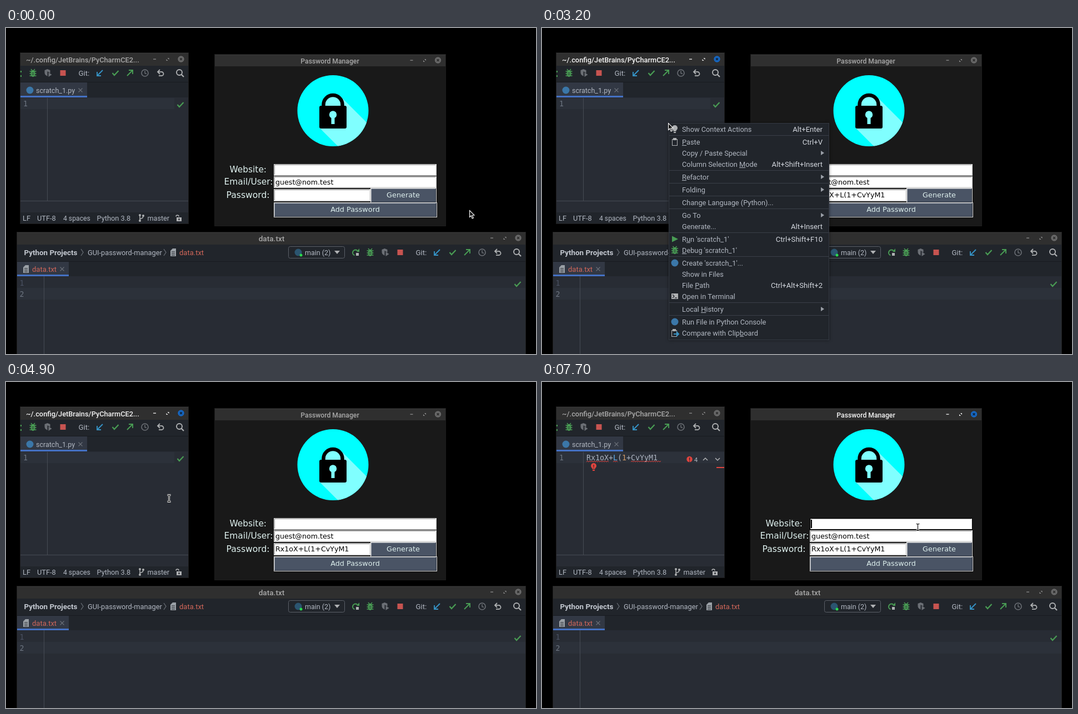
An HTML page with a canvas that plays this animation: 954x587 px, repeating every 8000 ms.

```html
<!DOCTYPE html>
<html lang="en">
<head>
<meta charset="utf-8">
<title>Password Manager demo</title>
<style>
html, body { margin: 0; width: 100%; height: 100%; overflow: hidden; background: #000; }
canvas { display: block; }
</style>
</head>
<body>
<canvas id="stage" width="954" height="587"></canvas>
<script>
const ctx = document.getElementById('stage').getContext('2d');
const LOOP = 8000;
const PASSWORD = 'Rx1oX+L(1+CvYyM1';
const EMAIL = 'guest@nom.test';
const C = {
  panel: '#21252b', editor: '#282c34', row: '#2c313a', tab: '#323844', text: '#b1b7c1',
  gray: '#afb1b3', dim: '#6b7078', line: '#464b54', green: '#499c54', blue: '#3592c4',
  red: '#c75450', untracked: '#d1675a', python: '#3b77a8', error: '#e0443e'
};
const ui = (size = 12.8, weight = 400) => `${weight} ${size}px Roboto, sans-serif`;
const tk = size => `${size}px "DejaVu Sans", sans-serif`;
const mono = '13.3px "DejaVu Sans Mono", monospace';

// --- basic helpers -------------------------------------------------------
function rect(x, y, w, h, fill) {
  ctx.fillStyle = fill;
  ctx.fillRect(x, y, w, h);
}
function frame(x, y, w, h, color) {
  ctx.strokeStyle = color;
  ctx.lineWidth = 1;
  ctx.strokeRect(x + .5, y + .5, w - 1, h - 1);
}
function disc(x, y, r, fill) {
  ctx.fillStyle = fill;
  ctx.beginPath();
  ctx.arc(x, y, r, 0, Math.PI * 2);
  ctx.fill();
}
function ring(x, y, r, color, width = 1.5, from = 0, to = Math.PI * 2) {
  ctx.strokeStyle = color;
  ctx.lineWidth = width;
  ctx.beginPath();
  ctx.arc(x, y, r, from, to);
  ctx.stroke();
}
function trace(x, y, pts) {
  ctx.beginPath();
  for (let i = 0; i < pts.length; i += 2) ctx.lineTo(x + pts[i], y + pts[i + 1]);
}
function line(x, y, pts, color, width = 1.5) {
  trace(x, y, pts);
  ctx.strokeStyle = color;
  ctx.lineWidth = width;
  ctx.stroke();
}
function poly(x, y, pts, fill) {
  trace(x, y, pts);
  ctx.fillStyle = fill;
  ctx.fill();
}
// y is the visual middle of the text line
function text(s, x, y, color = C.text, font = ui(), align = 'left') {
  ctx.font = font;
  ctx.textAlign = align;
  ctx.fillStyle = color;
  ctx.fillText(s, x, Math.round(y + 4.5));
}

// --- icons ---------------------------------------------------------------
const check = (x, y) => line(x, y, [-5, 0, -1.5, 4, 6, -4], C.green, 2.2);
const playRight = (x, y, color) => poly(x, y, [-5, -5.5, 6, 0, -5, 5.5], color);
const subArrow = (x, y) => poly(x, y, [-3, -4, 3, 0, -3, 4], '#9a9fa7');
const tabClose = (x, y) => {
  line(x, y, [-3.5, -3.5, 3.5, 3.5], C.dim, 1.1);
  line(x, y, [-3.5, 3.5, 3.5, -3.5], C.dim, 1.1);
};
function bug(x, y) {
  for (const dy of [-3, 1, 5]) line(x, y, [-6, dy, 6, dy], C.green, 1.5);
  ctx.fillStyle = C.green;
  ctx.beginPath();
  ctx.ellipse(x, y + 1, 4, 6, 0, 0, Math.PI * 2);
  ctx.fill();
  line(x, y, [-3.5, -7, -1, -4, 1, -4, 3.5, -7], C.green);
  line(x, y, [-2, 0, 2, 0], C.panel, 1);
  line(x, y, [-2, 3, 2, 3], C.panel, 1);
}
function shield(x, y) {
  poly(x, y, [-6, -5, -1, -7, 4, -5, 4, 0, -1, 6, -5, 3, -6, 0], '#6b6f75');
  poly(x, y, [-1, -3, 8, 3, -1, 8], C.panel);
  poly(x, y, [1, -1, 7, 3, 1, 7], '#6b6f75');
}
function diagonal(x, y, dir, color) {
  line(x, y, [-5 * dir, 5 * dir, 5 * dir, -5 * dir], color, 1.9);
  line(x, y, [-2 * dir, -5 * dir, 5 * dir, -5 * dir, 5 * dir, 2 * dir], color, 1.9);
}
function undo(x, y) {
  line(x, y, [-5, -2, 2, -2], C.gray, 1.8);
  ring(x + 2, y + 1.5, 3.5, C.gray, 1.8, -Math.PI / 2, Math.PI / 2);
  line(x, y, [2, 5, -3, 5], C.gray, 1.8);
  line(x, y, [-1, -6, -5, -2, -1, 2], C.gray, 1.8);
}
function search(x, y) {
  ring(x - 1, y - 1, 5, C.gray, 1.9);
  line(x, y, [2.5, 2.5, 7, 7], C.gray, 2.2);
}
function bulb(x, y, color) {
  disc(x, y - 2, 5, color);
  rect(x - 2.5, y + 2, 5, 2, color);
  rect(x - 2, y + 5, 4, 2, color);
}
function clipboard(x, y) {
  frame(x - 5, y - 5, 10, 12, C.gray);
  rect(x - 3, y - 7, 6, 4, C.gray);
}
function terminal(x, y) {
  rect(x - 6, y - 5, 12, 10, C.gray);
  line(x, y, [-4, -3, -1, 0, -4, 3], C.panel, 1.3);
  line(x, y, [0, 3, 4, 3], C.panel, 1.3);
}
function compare(x, y) {
  clipboard(x - 1, y);
  line(x, y, [-2, 2, 6, 2], C.blue, 2);
  line(x, y, [3, -2, 7, 2, 3, 6], C.blue, 2);
}
function fileIcon(x, y) {
  poly(x, y, [-1, -7, 5, -7, 5, 7, -5, 7, -5, -3], '#9aa0a6');
  for (const dy of [-1, 2, 5]) line(x, y, [-3, dy, 3, dy], C.panel, 1);
}
const pythonMark = (x, y) => disc(x, y, 6.5, C.python);

function toolbar(x, y) {
  bug(x, y);
  shield(x + 27, y);
  rect(x + 49, y - 5, 10, 10, C.red);
  text('Git:', x + 82, y, C.text, ui(13.2));
  diagonal(x + 120.5, y, -1, C.blue);
  check(x + 148, y);
  diagonal(x + 174.5, y, 1, C.green);
  ring(x + 201.5, y, 6, '#6b6f75', 1.6);
  line(x + 201.5, y, [0, -4, 0, 0.5, 3, 1.5], '#6b6f75', 1.4);
  undo(x + 229.5, y);
  search(x + 264.5, y);
}

// window outline, title bar and its three controls
function windowFrame(x, y, w, h, barHeight, active, closeX, midY) {
  frame(x - 1, y - 1, w + 2, h + 2, '#1c1c1c');
  rect(x, y, w, barHeight, '#2f2f2f');
  rect(x, y, w, 1, '#383838');
  const color = active ? '#f0f0f0' : '#8c8c8c';
  rect(closeX - 50, midY - 1, 5, 1.3, color);
  poly(closeX - 24, midY, [-.5, -2.5, 2.5, -2.5, 2.5, .5], color);
  poly(closeX - 24, midY, [-2.5, -.5, -2.5, 2.5, .5, 2.5], color);
  disc(closeX, midY - .5, 5.7, active ? '#1667c2' : '#696969');
  const cross = active ? '#0c2038' : '#2a2a2a';
  line(closeX, midY - .5, [-2, -2, 2, 2], cross, 1.4);
  line(closeX, midY - .5, [-2, 2, 2, -2], cross, 1.4);
}
const titleColor = active => active ? '#f4f4f4' : '#a9a9a9';

// --- scratch editor ------------------------------------------------------
function wave(x0, x1, y) {
  const pts = [];
  for (let x = x0; x <= x1; x += 2) pts.push(x, y + ((x - x0) / 2 % 2 ? -1 : 1));
  line(0, 0, pts, C.error, 1);
}
function drawCode(t) {
  text(PASSWORD.slice(0, 6), 80, 136, '#abb2bf', mono);
  text('L', 128, 136, '#61afef', mono);
  text('(', 136, 136, '#abb2bf', mono);
  text('1', 144, 136, '#d19a66', mono);
  text(PASSWORD.slice(9), 152, 136, '#abb2bf', mono);
  const caretOn = t < 5900 || (t >= 6400 && t < 6800);
  if (caretOn) rect(208, 128, 3, 16, '#568af2');
  if (t < 5300) return;
  wave(80, 120, 143);
  wave(128, 136, 143);
  wave(160, 214, 143);
  disc(265.5, 139, 5.2, C.error);
  text('!', 265.5, 139, C.editor, ui(10, 700), 'center');
  text('4', 274, 139, C.text, ui(11));
  line(294, 139, [-4, 2, 0, -2, 4, 2], C.gray);
  line(316, 139, [-4, -2, 0, 2, 4, -2], C.gray);
  rect(314, 153, 14, 2, C.error);
  if (t >= 6000) {
    bulb(93, 153, C.error);
    text('!', 93, 151, C.editor, ui(9, 700), 'center');
  }
}
function drawScratch(t) {
  const active = t >= 2900 && t < 6800;
  windowFrame(26, 45, 302, 307, 23, active, 315, 56.5);
  text('~/.config/JetBrains/PyCharmCE2...', 36, 57, titleColor(active), ui(12.8, 500));
  rect(26, 68, 302, 284, C.panel);
  rect(26, 97, 302, 1, '#181b20');
  rect(26, 77, 2, 3, C.green);
  rect(26, 85, 2, 3, C.green);
  toolbar(48.5, 81);
  rect(26, 98, 120, 27, C.tab);
  rect(26, 122, 120, 3, '#4571c4');
  pythonMark(43, 112);
  text('scratch_1.py', 54, 112, C.text, ui(12.5));
  tabClose(134, 112);
  rect(26, 125, 302, 207, C.editor);
  rect(26, 126, 302, 20, C.row);
  rect(74, 126, 1, 185, C.line);
  rect(26, 311, 302, 1, C.line);
  text('1', 31, 136, '#6e7682', mono);
  if (t < 5000) {
    rect(303, 126, 25, 22, C.editor);
    check(313.5, 138);
  } else drawCode(t);

  text('LF', 30, 342);
  text('UTF-8', 56, 342);
  text('4 spaces', 103, 342, C.text, ui(12.2));
  text('Python 3.8', 163.5, 342);
  text('master', 254.5, 342, C.text, ui(12.6));
  line(241, 342, [0, -5, 0, 5], C.gray, 1.5);
  line(241, 342, [0, 2, 5, 0, 6, -3], C.gray, 1.5);
  for (const [x, y] of [[241, 337], [241, 347], [247, 338]]) disc(x, y, 2, C.gray);
  rect(307, 341, 9, 7, C.gray);
  ring(308.5, 339.5, 2.5, C.gray, 1.5, Math.PI, 0);
  rect(310.5, 343, 2, 3, C.panel);
}

// --- password manager ----------------------------------------------------
function drawPadlock(x, y) {
  const light = '#80ffff';
  disc(x, y, 64, '#0ff');
  ctx.save();
  ctx.beginPath();
  ctx.arc(x, y, 64, 0, Math.PI * 2);
  ctx.clip();
  poly(x, y, [14, -25.5, 84, 44.5, 40, 95, -24, 31, -12, 0], light);
  ctx.restore();
  disc(x, y - 11, 15, light);
  rect(x - 15, y - 11, 30, 5, light);
  ring(x, y - 11, 17, '#000', 6.5, Math.PI, 0);
  for (const side of [-1, 1]) rect(x + side * 17 - 3.25, y - 11.5, 6.5, 6, '#000');
  ctx.fillStyle = '#000';
  ctx.beginPath();
  ctx.roundRect(x - 24.5, y - 9, 49, 41, 3);
  ctx.fill();
  disc(x, y + 7, 6.7, light);
  rect(x - 3, y + 10, 6, 14, light);
}
// one-pixel highlight ring around a one-pixel bevel
function bevel(x, y, w, h, ringColor, topLeft, bottomRight, fill) {
  rect(x, y, w, h, ringColor);
  rect(x + 1, y + 1, w - 2, h - 2, bottomRight);
  rect(x + 1, y + 1, w - 3, h - 3, topLeft);
  rect(x + 2, y + 2, w - 4, h - 4, fill);
}
function entry(y, w, h, value, focused) {
  bevel(482, y, w, h, focused ? '#000' : '#d9d9d9', '#999', '#e6e6e6', '#fff');
  text(value, 485, y + 10.5, '#000', tk(12.65));
}
function button(x, y, w, h, label, { hover = false, pressed = false } = {}) {
  const [fill, light, dark, color] = hover
    ? ['#f05454', '#f7a9a9', '#903232', '#1a1a1a']
    : ['#4a5465', '#a4a9b2', '#2c323d', '#def0ee'];
  bevel(x, y, w, h, '#d9d9d9', pressed ? dark : light, pressed ? light : dark, fill);
  const shift = pressed ? 1 : 0;
  text(label, x + w / 2 - .5 + shift, y + 12.5 + shift, color, tk(12.8), 'center');
}
function drawManager(t, mouse) {
  const active = (t >= 1300 && t < 2900) || t >= 6800;
  windowFrame(376, 48, 415, 308, 22, active, 777.5, 58.5);
  text('Password Manager', 583, 59.5, titleColor(active), ui(12.2, 500), 'center');
  rect(376, 69, 415, 287, '#191919');
  drawPadlock(588.5, 149);
  const label = '#def0ee';
  text('Website:', 402.5, 255.5, label, tk(15.4));
  text('Email/User:', 392.5, 277.5, label, tk(15.4));
  text('Password:', 396.5, 301, label, tk(15.6));
  const blinkOn = since => (t - since) % 900 < 600;
  const inPassword = t >= 1300 && t < 2900;
  const inWebsite = t >= 6800;
  const filled = t >= 1500;
  entry(245, 293, 21, '', inWebsite);
  entry(267, 293, 21, EMAIL, false);
  entry(290, 174, 22, filled ? PASSWORD : '', inPassword);
  if (inWebsite && blinkOn(6800)) rect(484, 248, 2, 15, '#000');
  if (inPassword && blinkOn(1300)) rect(filled ? 616 : 484, 293, 2, 16, '#000');

  const hover = mouse.x >= 657 && mouse.x < 774 && mouse.y >= 289 && mouse.y < 314;
  button(482, 314, 294, 27, 'Add Password');
  button(656, 288, 119, 27, 'Generate', { hover, pressed: t >= 1300 && t < 1500 });
}

// --- data file window ----------------------------------------------------
function drawData() {
  windowFrame(20, 368, 915, 230, 23, false, 922, 378.5);
  text('data.txt', 478, 379, titleColor(false), ui(13.6, 500), 'center');
  rect(20, 390, 915, 197, C.panel);
  rect(20, 420, 915, 1, '#181b20');
  text('Python Projects', 32.5, 404, '#c3c8d0', ui(13.4, 700));
  for (const x of [137, 286]) line(x, 404, [-2, -6, 2, 0, -2, 6], C.dim, 1.2);
  text('GUI-password-manager', 147, 404);
  fileIcon(301, 404);
  text('data.txt', 312, 404, C.untracked, ui(13));
  ctx.strokeStyle = '#5a5f67';
  ctx.lineWidth = 1;
  ctx.beginPath();
  ctx.roundRect(508.5, 393.5, 101, 21, 3);
  ctx.stroke();
  disc(526, 404, 6.5, '#2b5570');
  disc(531, 409, 2.5, '#2bd94f');
  text('main (2)', 538, 404, C.text, ui(12.5));
  poly(596, 404, [-5, -3, 5, -3, 0, 3], C.gray);
  ring(629, 404.5, 5, C.green, 2, Math.PI * .6, Math.PI * 1.75);
  poly(629, 404, [2, -1, 7, -1, 7, -7], C.green);
  rect(630, 405, 5, 5, C.gray);
  toolbar(655.5, 404);
  rect(20, 421, 93, 26, C.tab);
  rect(20, 444, 93, 3, '#4571c4');
  fileIcon(36, 434);
  text('data.txt', 47, 434, C.untracked, ui(13));
  tabClose(101, 434);
  rect(20, 447, 915, 140, C.editor);
  rect(20, 468, 915, 21, C.row);
  rect(68, 447, 1, 140, C.line);
  text('1', 24.5, 459, '#4b5263', mono);
  text('2', 24.5, 479, '#6e7682', mono);
  check(920.5, 461);
}

// --- context menu --------------------------------------------------------
// '&' marks the underlined letter, null is a separator, '>' opens a submenu
const MENU = [
  ['Show Context Actions', 'Alt+Enter', (x, y) => bulb(x, y, C.gray)], null,
  ['&Paste', 'Ctrl+V', clipboard],
  ['Copy / Paste Special', '>'],
  ['Column Selection &Mode', 'Alt+Shift+Insert'], null,
  ['&Refactor', '>'], null,
  ['Folding', '>'], null,
  ['Change Language (Python)...'], null,
  ['Go To', '>'],
  ['Generate...', 'Alt+Insert'], null,
  ["R&un 'scratch_1'", 'Ctrl+Shift+F10', (x, y) => playRight(x, y, C.green)],
  ["&Debug 'scratch_1'", '', bug], null,
  ["Create 'scratch_1'...", '', pythonMark],
  ['Show in Files'],
  ['File &Path', 'Ctrl+Alt+Shift+2'],
  ['Open in Terminal', '', terminal], null,
  ['Local &History', '>'], null,
  ['Run File in Python Console', '', pythonMark],
  ['Compare with Clip&board', '', compare]
];
const SPECIAL = [
  ['Copy Reference', 'Ctrl+Alt+Shift+C'], null,
  ['Paste from History...', 'Ctrl+Shift+V'],
  ['Paste without Formatting', 'Ctrl+Alt+Shift+V']
];
function drawMenu(items, x, y, w, selected) {
  const h = 4 + items.reduce((sum, item) => sum + (item ? 20 : 3), 0);
  ctx.save();
  ctx.shadowColor = 'rgba(0,0,0,.5)';
  ctx.shadowBlur = 5;
  rect(x, y, w, h, C.panel);
  ctx.restore();
  frame(x, y, w, h, '#343942');
  let top = y + 1;
  for (const item of items) {
    if (!item) {
      rect(x + 1, top + 1, w - 2, 1, '#3a3f48');
      top += 3;
      continue;
    }
    const [label, hint = '', icon] = item;
    const mid = top + 10;
    if (item === selected) rect(x + 1, top, w - 2, 20, '#323844');
    if (icon) icon(x + 11, mid);
    const mark = label.indexOf('&');
    const plain = label.replace('&', '');
    text(plain, x + 24, mid);
    if (mark >= 0) {
      const start = ctx.measureText(plain.slice(0, mark)).width;
      rect(x + 24 + start, mid + 6, ctx.measureText(plain[mark]).width, 1, C.text);
    }
    if (hint === '>') subArrow(x + 277, mid);
    else text(hint, x + w - 12, mid, '#d3d7de', ui(13.1), 'right');
    top += 20;
  }
}
function drawMenus(t) {
  if (t < 3200 || t >= 4900) return;
  const selected = t < 3600 ? null : t < 3700 ? MENU[2] : t < 4200 ? MENU[3] : MENU[2];
  drawMenu(MENU, 228, 171, 289, selected);
  if (t >= 3900 && t < 4300) drawMenu(SPECIAL, 516, 214, 262, null);
}

// --- pointer -------------------------------------------------------------
const easeOut = k => 1 - (1 - k) * (1 - k);
const linear = k => k;
const PATH = [
  [300, 834, 328], [800, 750, 304, easeOut],
  [2100, 750, 304], [2400, 427, 221, linear], [2900, 227, 171, easeOut],
  [3500, 227, 171], [3700, 298, 220, linear],
  [3800, 298, 220], [4300, 293, 209, linear],
  [5200, 293, 209], [5700, 665, 252, easeOut], [6000, 676, 261, easeOut]
];
function pointerAt(time) {
  const t = Math.floor(time / 100) * 100;
  const i = PATH.findIndex(key => key[0] >= t);
  const [t1, x1, y1, ease = linear] = PATH[i < 0 ? PATH.length - 1 : i];
  if (i <= 0) return { x: x1, y: y1 };
  const [t0, x0, y0] = PATH[i - 1];
  const k = ease((t - t0) / (t1 - t0));
  return { x: Math.round(x0 + (x1 - x0) * k), y: Math.round(y0 + (y1 - y0) * k) };
}
function drawPointer(t, { x, y }) {
  const within = (l, top, r, b) => x >= l && x < r && y >= top && y < b;
  const menuOpen = t >= 3200 && t < 4900;
  const overText = within(74, 126, 328, 311) || within(482, 245, 775, 288) || within(482, 290, 656, 312);
  if (overText && !menuOpen) {
    const beam = [-3, -6, -1, -6, 0, -5, 1, -6, 3, -6, 1, -6, 0, -5, 0, 5, -1, 6, -3, 6, 3, 6, 1, 6, 0, 5];
    line(x + .5, y + .5, beam, '#fff', 3);
    line(x + .5, y + .5, beam, '#111', 1.2);
    return;
  }
  const arrow = [.5, .5, .5, 12.5, 3.2, 10, 5.2, 15, 7.4, 14, 5.3, 9.3, 9, 9];
  poly(x, y, arrow, '#111');
  ctx.closePath();
  ctx.strokeStyle = '#fff';
  ctx.lineWidth = 1.1;
  ctx.stroke();
}

function render(now) {
  const t = now % LOOP;
  const mouse = pointerAt(t);
  rect(0, 0, 954, 587, '#000');
  drawScratch(t);
  drawManager(t, mouse);
  drawData();
  drawMenus(t);
  drawPointer(t, mouse);
}
const start = performance.now();
function tick() {
  render(performance.now() - start);
  requestAnimationFrame(tick);
}
tick();
</script>
</body>
</html>
```
